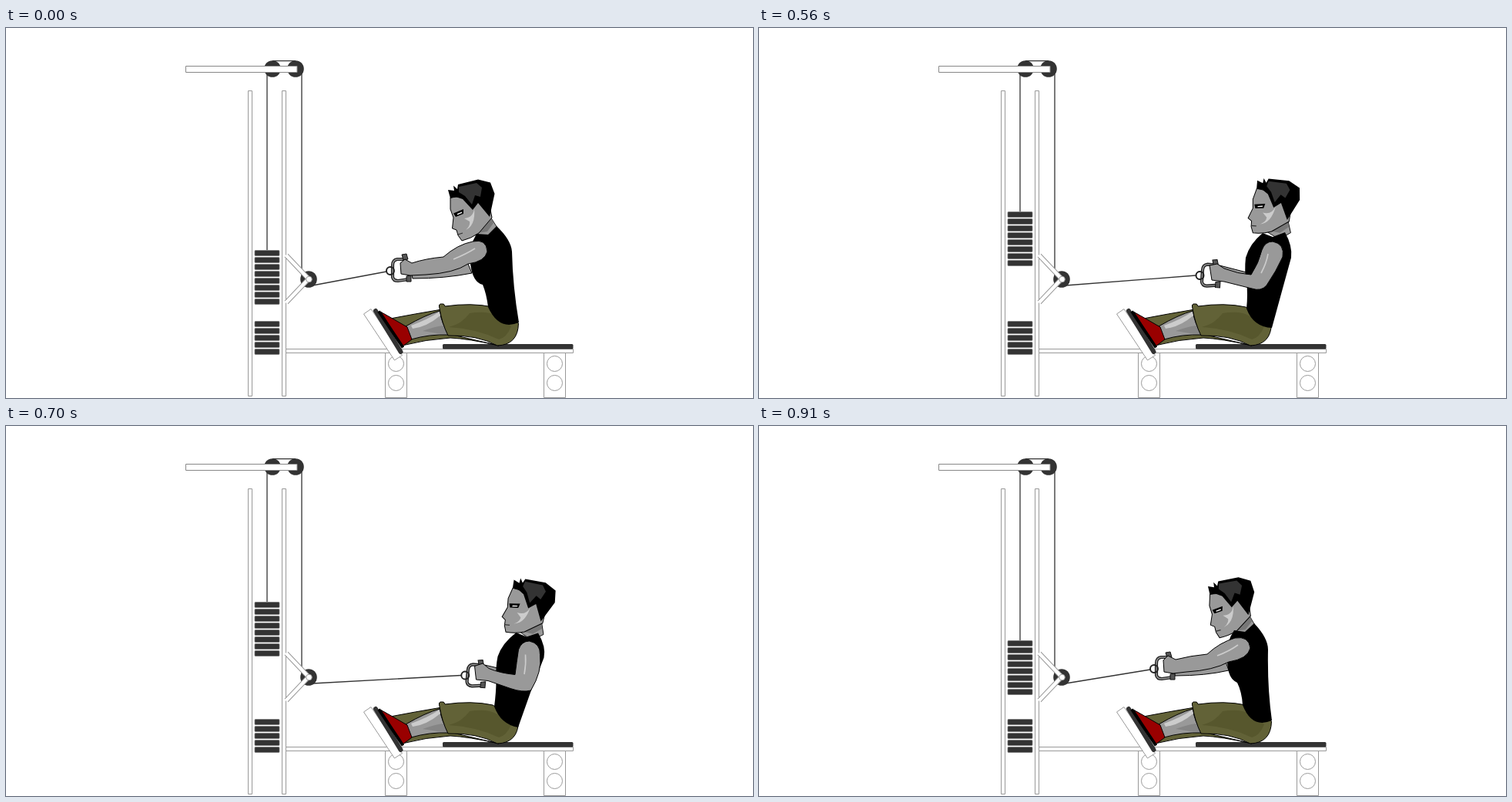
An HTML page for the animation above (1.33 s loop, 970 by 480 pixels).

```html
<!DOCTYPE html>
<html lang="en">
<head>
<meta charset="utf-8">
<title>Seated cable row</title>
<style>
  html, body { margin: 0; width: 100%; height: 100%; overflow: hidden; background: #fff; }
  svg { display: block; }
  .frame { fill: #fff; stroke: #999; }
  .dark { fill: #333; }
  .cable { fill: none; stroke: #333; stroke-width: 1.3; }
  .skin { fill: #999; stroke: #000; stroke-linejoin: round; }
  .light { fill: #ccc; }
  .pants { fill: #626237; stroke: #000; }
  .band { fill: none; stroke: #999; stroke-width: 6.5; }
  .band + .band { stroke: #fff; stroke-width: 4.5; }
</style>
</head>
<body>
<svg width="970" height="480" viewBox="0 0 970 480">
  <defs>
    <rect id="plate" x="323" y="288.5" width="32" height="7" rx="1" fill="#333" stroke="#777" stroke-width=".7"/>
    <g id="support" class="frame">
      <path d="M.5 421.5h28v58h-28z"/>
      <circle cx="14.5" cy="435.5" r="10"/>
      <circle cx="14.5" cy="460.5" r="10"/>
    </g>
  </defs>

  <!-- machine -->
  <path class="cable" d="M346 42.7H376M384 53V322"/>
  <path class="cable" id="lift"/>
  <g class="dark">
    <circle cx="346" cy="53" r="10.8"/>
    <circle cx="376" cy="53" r="10.8"/>
    <circle cx="393" cy="326" r="10.8"/>
  </g>
  <g class="frame">
    <path stroke="#888" d="M233.5 49.5h144.500v8h-144.500z"/>
    <path d="M314.500 81.500h5v396h-5zM358.500 81.500h5v396h-5z"/>
    <path d="M363.500 416.500h373v5h-373z"/>
  </g>
  <path class="band" d="M364 295L393 325.500L364 356"/>
  <path class="band" d="M363.500 294.500L393 325.500L363.500 356.500"/>
  <circle class="frame" cx="393.500" cy="326" r="3.800"/>
  <g id="fixed"></g>
  <g id="stack"></g>
  <use href="#support" x="492"/>
  <use href="#support" x="698"/>
  <rect x="567" y="410" width="169.500" height="6.500" rx="1.500" fill="#333"/>
  <path class="cable" id="rope"/>

  <!-- legs -->
  <path class="pants" d="M499 377Q530 371 566 365L580 398L640 412Q600 403 577 402Q545 404 514 412Z"/>
  <path class="skin" d="M519 387Q545 372 563 367Q566 384 575 398Q550 397 526 404Z"/>
  <path class="light" d="M526 386Q548 378 563 368L564 373Q546 388 528 390Z"/>
  <path fill="#858585" d="M541 393Q558 387 568 386L573 397Q556 396 541 393Z"/>
  <path class="pants" d="M566 358Q561 357 563 364Q566 383 574 399Q612 398 638 412Q665 411 665.500 383L632 362Q605 356 570 361Q569 357 566 358Z"/>
  <path fill="#57572d" d="M575 388Q592 384 602 370Q625 366 638 374L656 387Q650 402 640 404Q610 390 575 388Z"/>
  <path class="frame" d="M464.500 371L474 364.500L514.500 424.500L504.500 431Z"/>
  <path fill="none" stroke="#333" stroke-width="6" stroke-linecap="round" d="M480 367L512.500 420"/>
  <path fill="#900" stroke="#000" d="M487 368.500L502 377L521 388L527 404L515 413Z"/>
  <path fill="none" stroke="#000" stroke-width="4" d="M484 367.500L515.500 414.500"/>

  <!-- upper body -->
  <path class="skin" id="farArm"/>
  <g id="head">
    <path class="skin" stroke-width=".8" d="M606 268L629 245L638 259L627 272Z"/>
    <path fill="#777" d="M613 266L630 247L633 253L625 264Z"/>
    <path class="skin" d="M577 220V235L581 246L579.500 260L585 262L587 269L592 276Q604 273 614 266L631 246L625 215Z"/>
    <path d="M574 210L582 211L581 204.500L586 209L587 203L613 196.500L629 200.500L634.500 215L628 245L613 227L606 236L593 222L584 219L577 221Z"/>
    <path class="dark" d="M588 206L611 201L618 207L616 219L609 217L605 229L596 218L588 213Z"/>
    <path d="M581 240.500L594 235V241L584 245Z"/>
    <path fill="#fff" d="M586 241L592 238.500V240L586 242.500Z"/>
    <path class="light" d="M608 234Q607 246 595 247L602 251Q603 257 597 262Q610 256 608 234Z"/>
    <path class="cable" stroke-width="1.500" d="M586.500 268L593 266"/>
  </g>
  <path id="torso"/>
  <g id="grip">
    <path fill="none" stroke="#222" stroke-width="4.200" d="M18-15H9Q3-14 3-7V8Q4 13 10 13L24 11"/>
    <path fill="none" stroke="#999" stroke-width="1.400" d="M18-15H9Q3-14 3-7V8Q4 13 10 13L24 11"/>
    <path fill="#555" stroke="#111" d="M15-21L21-22L23-15L17-14ZM21 7L27 6L27 14L21 14Z"/>
    <circle r="5" fill="none" stroke="#222" stroke-width="2"/>
  </g>
  <path class="skin" id="arm"/>
  <path id="shine" fill="none" stroke="#ccc" stroke-width="1.600"/>
</svg>
<script>
const $ = id => document.getElementById(id);

const plates = (top, count) => Array.from({ length: count },
  (_, i) => `<use href="#plate" y="${top + 9 * i}"/>`).join('');
$('stack').innerHTML = plates(0, 8);
$('fixed').innerHTML = plates(92, 5);

// Key poses of each moving part, from arms stretched to fully pulled.
const turn = (x, y, angle, cx = 0, cy = 0) => `translate(${x} ${y}) rotate(${angle}) translate(${cx} ${cy})`;
const head = (x, y, angle) => turn(x, y, angle, -575, -210);
const parts = [
  ['stack', 'transform', [0, -10, -50, -70].map(y => `translate(0 ${y})`)],
  ['lift', 'd', [288, 278, 238, 218].map(y => `M339 57V${y}`)],
  ['rope', 'd', ['494 316', '508 316', '567 321', '615 326'].map(end => `M398 334L${end}`)],
  ['head', 'transform', [head(575, 210, 0), head(584, 208, 2.5), head(648, 198, 20), head(673, 202, 28.3)]],
  ['grip', 'transform', [turn(499, 315, 0), turn(513, 315, 0), turn(572.5, 321, 4), turn(620, 326, 6)]],
  ['torso', 'd', [
    'M611 267L626 268L637 257Q656 275 657 290Q658 335 666 382Q640 393 626 362Q624 345 619 333Q606 330 603 306Q600 285 611 267Z',
    'M617 265L631 267L643 256Q661 275 661 290Q660 340 666 382Q640 393 628 362Q627 345 621 333Q609 328 608 306Q604 285 617 265Z',
    'M654 266L667 271L683 265Q693 283 691 298Q678 345 666 389Q642 388 633 364Q635 345 633 330Q630 315 632 298Q637 280 654 266Z',
    'M671 270L685 276L699 272Q710 290 706 303Q683 345 664 393Q643 386 635 364Q638 345 640 330Q641 312 645 300Q652 283 671 270Z'
  ]],
  ['arm', 'd', [
    'M512 305L518 300L527 305Q545 299 568 297Q586 281 606 277Q624 273 625 290Q622 303 600 306Q582 318 545 320L525 321L513 319Z',
    'M525 304L531 298L541 303Q560 298 582 296Q598 281 618 275Q636 272 638 288Q635 302 610 306Q590 317 555 319L538 321L526 319Z',
    'M585 308L595 306L604 312Q622 319 639 320Q649 305 653 288Q657 277 667 277Q683 280 680 297Q672 315 659 334Q652 342 640 338L604 329L588 327Z',
    'M632 315L643 310L650 317Q660 322 683 325Q677 308 678 292Q682 281 692 281Q705 284 707 296Q721 322 704 352Q690 350 670 343L648 332L633 331Z'
  ]],
  ['farArm', 'd', [
    'M526 314L600 306L605 318Q570 325 528 325Z',
    'M539 314L606 306L610 317Q580 324 540 324Z',
    'M598 308L633 317L633 325Q615 326 600 322Z',
    'M645 312L670 317L670 325Q655 326 645 322Z'
  ]],
  ['shine', 'd', ['M581 300Q598 293 609 286', 'M595 298Q611 292 622 284', 'M652 318Q659 305 661 293', 'M694 326Q692 313 688 300']]
];

function mix(a, b, k) {
  const number = /-?\d+(\.\d+)?/g, ends = b.match(number);
  let i = 0;
  return a.replace(number, n => +n + (ends[i++] - n) * k);
}

const LOOP = 1330, HOLD = 420, STEP = 70;
const levels = [0, 1, 1.5, 2, 3, 2.5, 2, 1.5, 1];
const start = performance.now();

function draw(now) {
  const t = Math.max(0, now - start) % LOOP;
  const step = t < HOLD ? 0 : Math.min(8, 1 + Math.floor((t - HOLD) / STEP));
  const level = levels[step], low = Math.floor(level), high = Math.ceil(level);
  for (const [id, attribute, poses] of parts)
    $(id).setAttribute(attribute, mix(poses[low], poses[high], level - low));
  requestAnimationFrame(draw);
}
draw(start);
</script>
</body>
</html>
```
